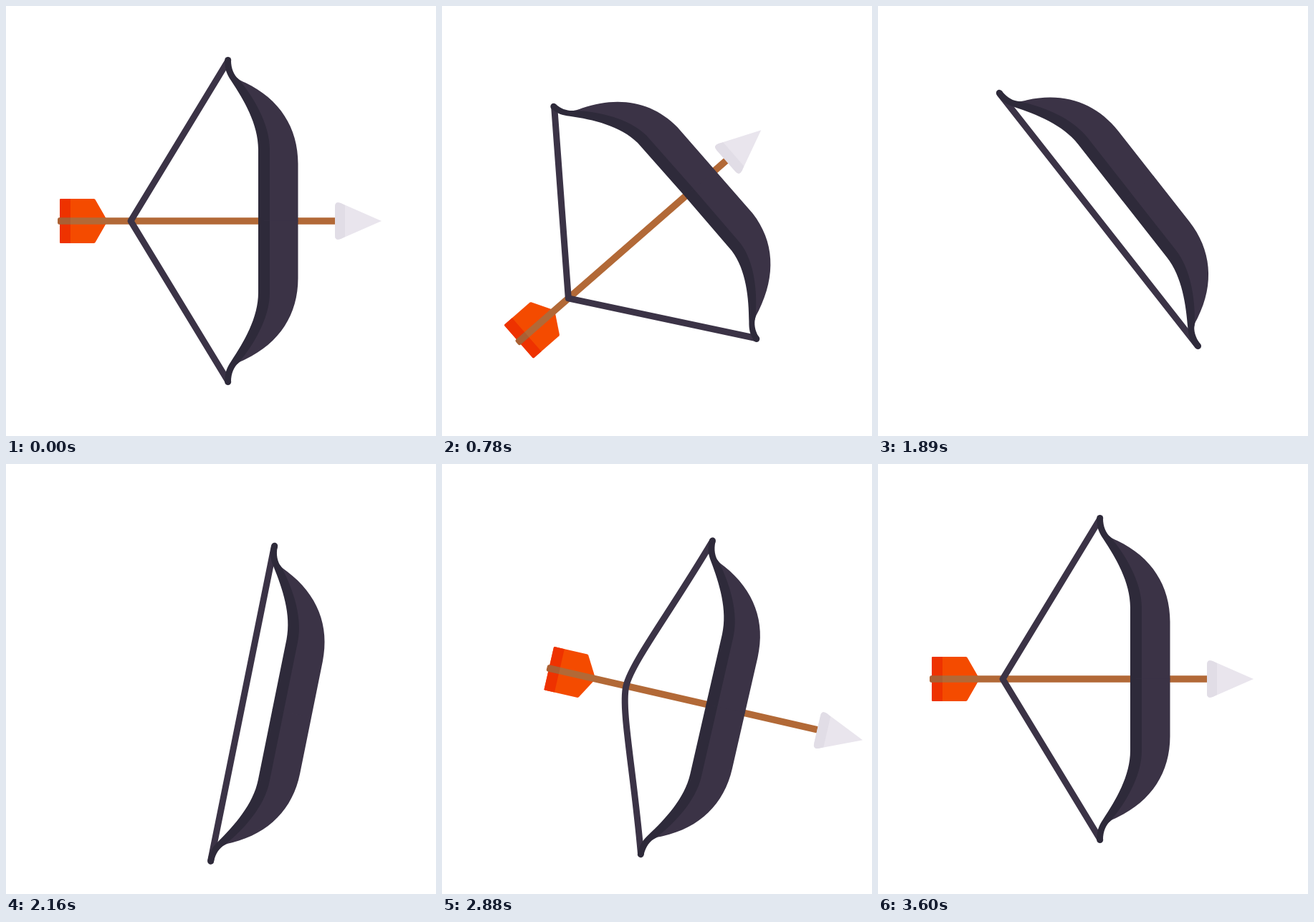
An HTML page with a canvas for the animation above (5.63 s loop, 600 by 600 pixels).

```html
<!DOCTYPE html>
<html lang="en">
<head>
<meta charset="utf-8">
<title>Bow and arrow</title>
<style>
html, body { margin: 0; width: 100%; height: 100%; overflow: hidden; background: #fff; }
canvas { display: block; width: 100vmin; height: 100vmin; }
</style>
</head>
<body>
<canvas id="stage" width="600" height="600"></canvas>
<script>
const ctx = document.getElementById('stage').getContext('2d');
const LOOP = 5630, STEP = 30, END = 3600;
const DARK = '#2e2a3a', PLUM = '#3b3346', WOOD = '#b26937';
const RED = '#f44b00', DEEP = '#ee3200', STEEL = '#e9e5ed', SHADE = '#e1dde6';

const clamp = v => Math.min(1, Math.max(0, v));
const part = (t, a, b) => clamp((t - a) / (b - a));
const mix = (a, b, k) => a + (b - a) * k;
const outPow = (u, n) => 1 - (1 - u) ** n;
const inOut = u => u < .5 ? 2 * u * u : 1 - 2 * (1 - u) ** 2;

// CSS-like "ease" curve, solved by bisection
function ease(u) {
  const at = (p, q, s) => 3 * p * s * (1 - s) ** 2 + 3 * q * s * s * (1 - s) + s ** 3;
  let lo = 0, hi = 1;
  for (let i = 0; i < 22; i++) {
    const mid = (lo + hi) / 2;
    if (at(.25, .25, mid) < u) lo = mid; else hi = mid;
  }
  return at(.1, 1, lo);
}

// Angle in degrees (counter-clockwise) and offset of the bow
function pose(t) {
  if (t < 1770) return { angle: 45 * outPow(part(t, 0, 1105), 2), x: 0, y: 0 };
  if (t < 2290) {
    const k = inOut(part(t, 1770, 2290));
    return { angle: mix(45, -19.5, k), x: 27 * k * k, y: 37 * k };
  }
  const settle = inOut(part(t, 2290, 2400));
  const rest = 1 - ease(part(t, 2708, 3590));
  return {
    angle: -mix(19.5, 18, settle) * rest,
    x: mix(27, 25, settle) * rest,
    y: mix(37, 33, settle) * rest
  };
}

// Distance of the arrow from its resting place along the shaft
function slide(t) {
  if (t < 1290) return -38 * outPow(part(t, 0, 1140), 1.5);
  if (t < 1740) return -38 + 327 * ((t - 1290) / 90) ** 1.5;
  return 52 * ((END - t) / 720) ** 2 + 143 * (Math.max(0, 2880 - t) / 480) ** 2;
}

// Limb bend: positive when drawn, negative after the shot
function bend(t, s) {
  if (t < 1290) return -s / 30;
  if (t < 1380) return mix(1.27, -1.5, part(t, 1290, 1380));
  return -1.5 * (1 - part(t, 1380, 1800));
}

function limb(x, y, g) {
  const w = clamp((Math.abs(y - 300) - 80) / 145) ** 1.5;
  return [x - 300 - 12.8 * g * w, (y - 300) * (1 - .04 * Math.max(g, 0) * w)];
}

function shape(color, draw) {
  ctx.beginPath();
  draw();
  ctx.closePath();
  ctx.fillStyle = color;
  ctx.fill();
}

function polygon(color, ...pts) {
  shape(color, () => pts.forEach(p => ctx.lineTo(...p)));
}

function head(color, edge, half) {
  shape(color, () => {
    ctx.moveTo(159, -20);
    ctx.quadraticCurveTo(159, -28, 167, -25);
    ctx.lineTo(edge, -half);
    ctx.lineTo(edge, half);
    ctx.lineTo(167, 25);
    ctx.quadraticCurveTo(159, 28, 159, 20);
  });
}

function drawArrow(s) {
  ctx.save();
  ctx.translate(s, 0);
  polygon(RED, [-225, -30], [-224, -31], [-177, -31], [-175.5, -30], [-160, -3],
    [-160, 3], [-175.5, 30], [-177, 31], [-224, 31], [-225, 30]);
  polygon(DEEP, [-225, -30], [-224, -31], [-210, -31], [-210, 31], [-224, 31], [-225, 30]);
  ctx.fillStyle = WOOD;
  ctx.beginPath();
  ctx.roundRect(-228, -4.8, 390, 9.6, 2.5);
  ctx.fill();
  ctx.fillStyle = 'rgba(140,60,40,.22)';
  ctx.fillRect(-227, -4.8, 17, 9.6);
  head(STEEL, 224, 0);
  head(SHADE, 173, 22);
  ctx.restore();
}

function drawString(s, g) {
  const [tx, ty] = limb(309.5, 77, g);
  const nock = Math.min(tx, -126 + 1.22 * s);
  const soft = 70 * clamp((nock + 126) / 135.5);
  ctx.beginPath();
  ctx.moveTo(tx, ty);
  ctx.bezierCurveTo(mix(tx, nock, .5), ty / 2, nock, -soft, nock, 0);
  ctx.bezierCurveTo(nock, soft, mix(tx, nock, .5), -ty / 2, tx, -ty);
  ctx.lineWidth = 9;
  ctx.lineJoin = ctx.lineCap = 'round';
  ctx.strokeStyle = PLUM;
  ctx.stroke();
}

function drawBow(g) {
  for (const side of [1, -1]) {
    const p = (x, y) => limb(x, y, g);
    const curve = (a, b, c) => ctx.bezierCurveTo(...p(...a), ...p(...b), ...p(...c));
    ctx.save();
    ctx.scale(1, side);
    shape(PLUM, () => {
      ctx.moveTo(...p(322, 100));
      curve([326, 104], [330, 105], [334, 107]);
      curve([382, 130], [407.5, 170], [407.5, 220]);
      ctx.lineTo(107.5, .4);
      ctx.lineTo(60, .4);
      ctx.lineTo(...p(360, 205));
      curve([360, 165], [340, 130], [318, 102]);
    });
    shape(DARK, () => {
      ctx.moveTo(...p(305.5, 76));
      curve([305, 88], [308, 95], [314, 104]);
      curve([332, 131], [352, 165], [352, 200]);
      ctx.lineTo(52, .4);
      ctx.lineTo(68, .4);
      ctx.lineTo(...p(368, 200));
      curve([368, 165], [346, 128], [325, 102.5]);
      curve([318, 97], [314, 87], [314, 76]);
    });
    shape(DARK, () => ctx.arc(...p(309.7, 75.5), 4.5, 0, 7));
    ctx.restore();
  }
}

function render(t) {
  const { angle, x, y } = pose(t), s = slide(t), g = bend(t, s);
  ctx.setTransform(1, 0, 0, 1, 0, 0);
  ctx.fillStyle = '#fff';
  ctx.fillRect(0, 0, 600, 600);
  ctx.translate(300 + x, 300 + y);
  ctx.rotate(-angle * Math.PI / 180);
  drawArrow(s);
  drawString(s, g);
  drawBow(g);
}

const start = performance.now();
function tick() {
  const t = (performance.now() - start) % LOOP;
  render(Math.min(END, Math.floor(t / STEP) * STEP));
  requestAnimationFrame(tick);
}
tick();
</script>
</body>
</html>
```
